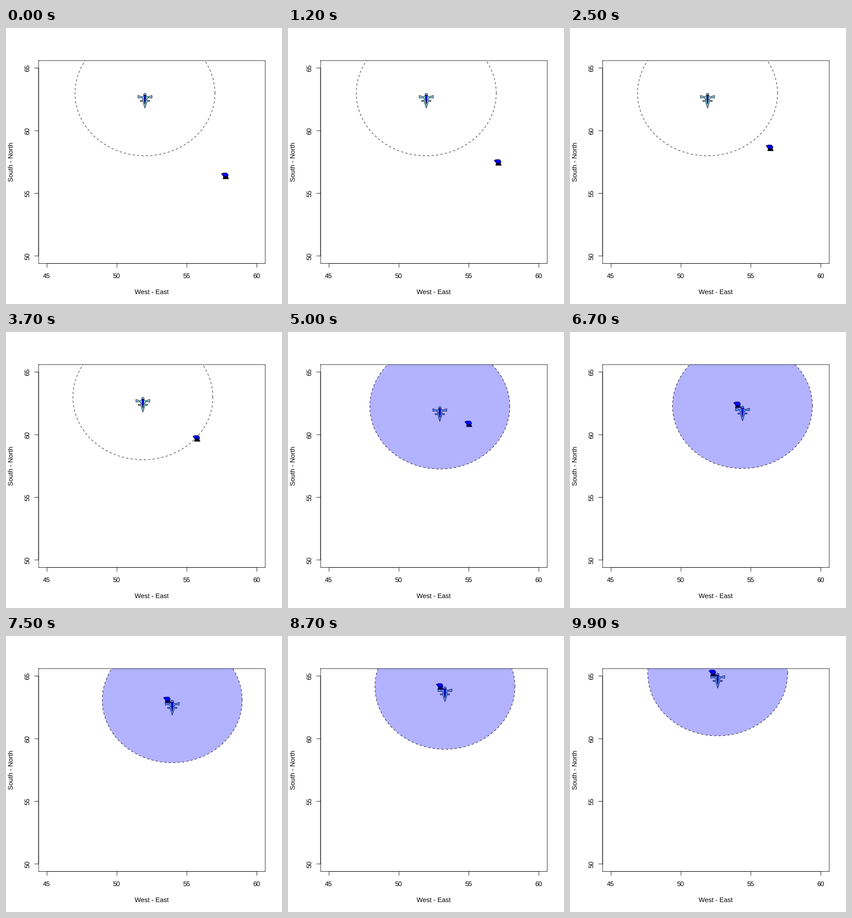
Write a matplotlib script that moves like this. It is 500 by 500 pixels and loops after 10000 ms.

```python
import numpy as np
import matplotlib.pyplot as plt
from matplotlib.animation import FuncAnimation
from matplotlib.lines import Line2D
from matplotlib.patches import Polygon
from matplotlib.transforms import Affine2D

SIZE, FRAMES, STEP = 500, 100, 100
LEFT, RIGHT, TOP, BOTTOM = 59.04, 469.76, 59.04, 426.56
LOW_X, LOW_Y, SPAN = 44.4, 49.4, 16.2
UNIT = np.array([(RIGHT - LEFT) / SPAN, -(BOTTOM - TOP) / SPAN])
PX = 0.72  # one pixel in points
LINE = 0.75 * PX
TICK = 7.2

RANGE = 5
PREY_START, PREY_STEP = np.array([57.73, 56.39]), np.array([-0.0552, 0.0895])
CRUISE, LUNGE, NEAR = 0.1, 0.13, 0.5
TRAIL = np.array([0.36, -0.02])  # the hunter keeps this far beside the prey

plt.rcParams.update({"font.family": "Liberation Sans", "font.size": 12 * PX,
                     "text.hinting": "none"})

fig = plt.figure(figsize=(5, 5), dpi=100, facecolor="white")
ax = fig.add_axes([LEFT / SIZE, 1 - BOTTOM / SIZE,
                   (RIGHT - LEFT) / SIZE, (BOTTOM - TOP) / SIZE])
ax.set(xlim=(LOW_X, LOW_X + SPAN), ylim=(LOW_Y, LOW_Y + SPAN))
ax.axis("off")
pixels = Affine2D().scale(1 / SIZE, -1 / SIZE).translate(0, 1) + fig.transFigure


def line(xs, ys):
    fig.add_artist(Line2D(xs, ys, color="black", lw=LINE, snap=False,
                          transform=pixels, zorder=-1))


def label(x, y, text, rotation=0):
    fig.text(x, y, text, rotation=rotation, transform=pixels, ha="center",
             va="baseline", rotation_mode="anchor")


def draw_frame():
    line([LEFT, RIGHT, RIGHT, LEFT, LEFT], [TOP, TOP, BOTTOM, BOTTOM, TOP])
    xs = {v: LEFT + (v - LOW_X) * UNIT[0] for v in range(45, 61, 5)}
    ys = {v: BOTTOM + (v - LOW_Y) * UNIT[1] for v in range(50, 66, 5)}
    line([xs[45], xs[60]], [BOTTOM, BOTTOM])
    line([LEFT, LEFT], [ys[50], ys[65]])
    for v, x in xs.items():
        line([x, x], [BOTTOM, BOTTOM + TICK])
        label(x - 0.4, 453, str(v))
    for v, y in ys.items():
        line([LEFT - TICK, LEFT], [y, y])
        label(42.2, y, str(v), 90)
    label((LEFT + RIGHT) / 2 - 1, 482, "West - East")
    label(13.3, (TOP + BOTTOM) / 2, "South - North", 90)


def shape(points, color, z):
    """Outlined polygon; points are pixel offsets from its anchor."""
    patch = Polygon([(0, 0)], fc=color, ec="black", lw=LINE, zorder=z,
                    joinstyle="round")
    ax.add_patch(patch)
    return patch, np.array(points) / UNIT


def mirror(half):
    return half + [(-x, y) for x, y in reversed(half)]


def chase():
    """Patrol slowly west, then pursue the prey once it is in range."""
    hunter, seen, track = np.array([52.0, 63.0]), False, []
    for i in range(FRAMES):
        prey = PREY_START + i * PREY_STEP
        seen = seen or np.hypot(*(prey - hunter)) < RANGE
        if seen:
            way = prey + TRAIL - hunter
            gap = np.hypot(*way)
            speed = CRUISE if gap > NEAR else LUNGE
            hunter = hunter + way * min(1, speed / max(gap, 1e-9))
        else:
            hunter = np.array([52 - 0.004 * i, 63])
        track.append((hunter, prey, seen))
    return track


draw_frame()
turn = np.linspace(0, 2 * np.pi, 361)
ring = np.column_stack([np.cos(turn), np.sin(turn)])

hunter_parts = [
    shape(mirror([(0, 3), (-2, 4.5), (-5, 6.5), (-12.8, 4.2), (-12.6, 9),
                  (-6, 8.2), (-3, 11.5), (-4, 13), (-8.8, 13.2),
                  (-7.8, 15.3), (-4, 14.5), (0, 27.2)]), "skyblue", 3),
    shape(ring * 2.3 + (0, 2.6), "skyblue", 3.1),
    shape(mirror([(-1, 3.5), (-1.5, 7), (-1.2, 14), (0, 20)]), "blue", 3.2),
]
prey_parts = [
    shape([(-3, 0), (5, 0), (4.6, 2), (6.4, 5.2), (-3.8, 5.2), (-3, 2)],
          "black", 4),
    shape([(-6.8, -3.8), (-3, -5.3), (3, -5.3), (5.7, -2), (4.8, 1.2),
           (-2.8, 1.2)], "blue", 4.1),
]
zone = Polygon([(0, 0)], fc="none", ec="black", lw=LINE, zorder=5,
               ls=(0, (4 / 0.75, 4 / 0.75)))
ax.add_patch(zone)
track = chase()


def place(parts, pos):
    for patch, offsets in parts:
        patch.set_xy(offsets + pos)


def update(i):
    hunter, prey, seen = track[i]
    place(hunter_parts, hunter)
    place(prey_parts, prey)
    zone.set_xy(ring * RANGE + hunter)
    zone.set_facecolor((0, 0, 1, 0.3) if seen else "none")
    return [zone]


anim = FuncAnimation(fig, update, frames=FRAMES, interval=STEP,
                     repeat=True, repeat_delay=0)
plt.show()
```
